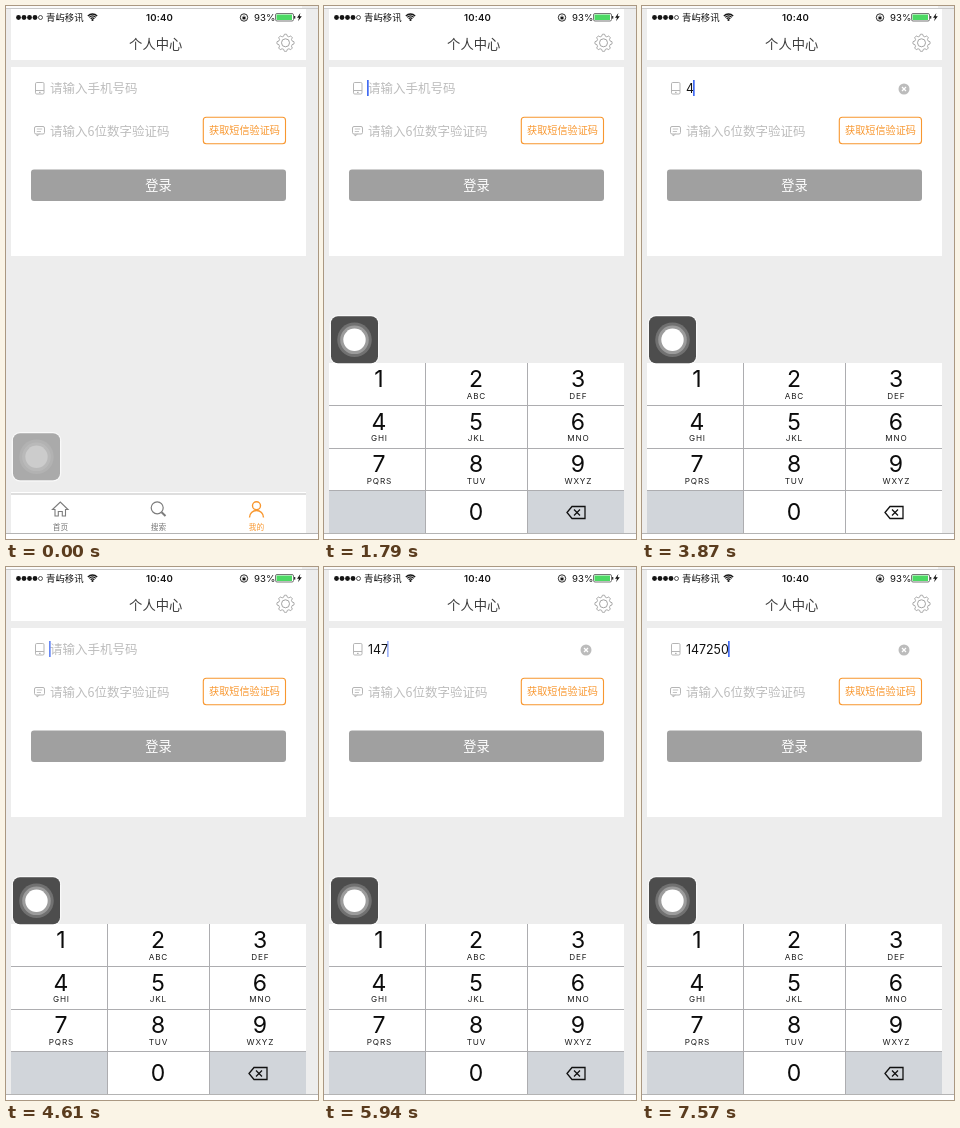
An HTML page with a canvas that plays this animation: 312x533 px, repeating every 8000 ms.

```html
<!DOCTYPE html>
<html lang="zh">
<head>
<meta charset="utf-8">
<title>个人中心</title>
<style>
html, body { margin: 0; width: 100%; height: 100%; overflow: hidden; background: #ededed; }
canvas { display: block; width: 312px; height: 533px; }
</style>
</head>
<body>
<canvas id="stage"></canvas>
<script>
const W = 312, H = 533, LOOP = 8000;
const LATIN = 'Inter, Roboto, sans-serif';
const HAN = '"Noto Sans CJK SC", "Noto Sans CJK", sans-serif';
const ORANGE = '#f8972f', KEY_GRAY = '#d1d5da', LINE = '#adadb0';

const canvas = document.getElementById('stage');
const ctx = canvas.getContext('2d');
const ratio = window.devicePixelRatio || 1;
canvas.width = W * ratio;
canvas.height = H * ratio;

// [start, typed digits, pressed key]
const typing = [
  [0, '', ''],
  [2090, '', '4'], [2240, '4', ''], [2390, '4', '7'], [2540, '47', ''],
  [3870, '4', 'del'], [4020, '', 'del'], [4170, '', ''],
  [4760, '', '1'], [4910, '1', ''], [5050, '1', '4'], [5200, '14', ''],
  [5350, '14', '7'], [5490, '147', '7'], [5640, '147', ''],
  [6690, '147', '2'], [6840, '1472', ''], [6990, '1472', '5'],
  [7130, '14725', ''], [7280, '14725', '0'], [7430, '147250', '0'], [7570, '147250', '']
];
// [start, caret opacity]
const blink = [
  [0, 0], [1050, 1], [2990, .6], [3130, .25], [3280, 0], [3570, 1],
  [4610, .8], [4760, 1], [5940, .5], [6090, 0], [6390, .6], [6540, 1]
];
// moments at which the sliding parts are redrawn
const slide = [[0], [1050], [1200], [1340], [1490], [1640], [1790]];

const keys = [['1', ''], ['2', 'ABC'], ['3', 'DEF'], ['4', 'GHI'], ['5', 'JKL'], ['6', 'MNO'],
  ['7', 'PQRS'], ['8', 'TUV'], ['9', 'WXYZ'], ['', ''], ['0', ''], ['del', '']];
const colX = [5, 101.5, 203.5, 300], colMid = [55, 152, 254], ROW = 42.5;

const at = (list, t) => list.filter(s => s[0] <= t).pop();
const clamp = v => Math.max(0, Math.min(1, v));

function box(x, y, w, h, color) {
  ctx.fillStyle = color;
  ctx.fillRect(x, y, w, h);
}

function round(x, y, w, h, r) {
  ctx.beginPath();
  ctx.roundRect(x, y, w, h, r);
}

function disc(x, y, r, color) {
  ctx.beginPath();
  ctx.arc(x, y, r, 0, 7);
  ctx.fillStyle = color;
  ctx.fill();
}

function ring(x, y, r, color, width) {
  ctx.beginPath();
  ctx.arc(x, y, r, 0, 7);
  stroke(color, width);
}

function stroke(color, width) {
  ctx.strokeStyle = color;
  ctx.lineWidth = width;
  ctx.stroke();
}

function path(points, color, width, closed) {
  ctx.beginPath();
  points.forEach(p => ctx.lineTo(p[0], p[1]));
  if (closed) ctx.closePath();
  stroke(color, width);
}

function text(str, x, y, size, color, { align = 'center', weight = 400, family = HAN, gap = 0 } = {}) {
  ctx.font = `${weight} ${size}px ${family}`;
  ctx.letterSpacing = gap + 'px';
  ctx.textAlign = align;
  ctx.fillStyle = color;
  ctx.fillText(str, x, y);
}

function statusBar() {
  const ink = '#151515';
  for (let i = 0; i < 4; i++) disc(12.5 + i * 5.5, 11.5, 2.4, ink);
  ring(34.5, 11.5, 2, ink, .7);
  text('青屿移讯', 40, 15, 9.4, ink, { align: 'left' });
  for (const r of [2.6, 4.6, 6.6]) {
    ctx.beginPath();
    ctx.arc(86.5, 14.6, r, -Math.PI * .75, -Math.PI * .25);
    stroke(ink, 1.3);
  }
  disc(86.5, 14, 1.1, ink);
  text('10:40', 153.5, 15, 9.6, ink, { weight: 600, family: LATIN, gap: .2 });
  ring(238, 11.5, 3.7, ink, .9);
  box(236.5, 11, 3, 2.4, ink);
  ring(238, 10.8, 1, ink, .6);
  text('93%', 248, 15, 9.6, ink, { align: 'left', family: LATIN });
  round(269.5, 7.5, 18, 7.5, 1.5);
  stroke('#555', .8);
  box(270.5, 8.5, 15.5, 5.5, '#4cd964');
  box(288, 10, 1.3, 2.6, '#333');
  ctx.beginPath();
  [[294.4, 7], [291, 11.8], [293, 11.8], [292, 15.2], [295.8, 10.3], [293.6, 10.3]].forEach(p => ctx.lineTo(...p));
  ctx.fillStyle = ink;
  ctx.fill();
}

function gear(x, y) {
  ctx.beginPath();
  for (let i = 0; i < 96; i++) {
    const a = i / 96 * Math.PI * 2;
    const r = 7.7 + .9 * Math.tanh(3 * Math.cos(a * 8));
    ctx.lineTo(x + r * Math.cos(a), y + r * Math.sin(a));
  }
  ctx.closePath();
  stroke('#a2a2a2', 1);
  ring(x, y, 4, '#a2a2a2', 1);
}

function form(typed, caret) {
  const pale = '#b5b5b5', hint = '#bdbdbd';
  box(5, 61, 295, 189, '#fff');
  round(29.5, 76.5, 8.5, 11.5, 1.2);
  stroke(pale, 1);
  path([[29.5, 84.5], [38, 84.5]], pale, 1);
  box(33, 85.8, 1.6, 1.2, pale);
  if (typed) {
    text(typed, 44, 86.7, 12.4, '#111', { align: 'left', family: LATIN });
    disc(262, 83, 5.5, '#bcbcbc');
    path([[260, 81], [264, 85]], '#fff', 1.2);
    path([[264, 81], [260, 85]], '#fff', 1.2);
  } else {
    text('请输入手机号码', 44, 86.6, 12.5, hint, { align: 'left', weight: 300 });
  }
  ctx.font = `400 12.4px ${LATIN}`;
  ctx.letterSpacing = '0px';
  const caretX = Math.round(43.4 + ctx.measureText(typed).width);
  ctx.globalAlpha = caret;
  box(caretX, 74, 1.7, 16, '#426bf2');
  ctx.globalAlpha = 1;

  round(28.5, 120.5, 10, 7.5, 1.5);
  stroke(pale, 1);
  path([[31, 128], [31, 130], [33.5, 128]], pale, .9);
  path([[30.8, 123], [36.2, 123]], pale, .8);
  path([[30.8, 125.5], [35, 125.5]], pale, .8);
  text('请输入6位数字验证码', 44, 129.8, 12.5, hint, { align: 'left', weight: 300 });
  round(197.3, 111.3, 82.2, 26.5, 3);
  stroke(ORANGE, 1.1);
  text('获取短信验证码', 238.5, 128.3, 10.15, ORANGE, { weight: 500 });
  round(25, 163.5, 255, 31.5, 3);
  ctx.fillStyle = '#a0a0a0';
  ctx.fill();
  text('登录', 152.5, 183.8, 13.2, '#fff');
}

function tabBar() {
  const gray = '#7c7c7c';
  box(5, 486, 295, 41, '#fff');
  box(5, 487.5, 295, 1, '#bdbdbd');
  path([[46.5, 503.5], [54.3, 496], [62, 503.5], [59.5, 503.5], [59.5, 510], [56.3, 510], [56.3, 505.5],
    [52.3, 505.5], [52.3, 510], [49, 510], [49, 503.5]], gray, 1.1, true);
  ring(151.2, 501.8, 6, gray, 1.2);
  path([[155.6, 506.2], [159.5, 510]], gray, 2);
  ring(250.5, 499.7, 4, ORANGE, 1.4);
  ctx.beginPath();
  ctx.arc(250.5, 511.5, 7, Math.PI, 0);
  stroke(ORANGE, 1.4);
  text('首页', 54.5, 523.8, 7.7, '#777');
  text('搜索', 152.5, 523.8, 7.7, '#777');
  text('我的', 250.5, 523.8, 7.7, ORANGE, { weight: 500 });
}

function backspace(x, y) {
  path([[x - 9, y], [x - 4, y - 6], [x + 9, y - 6], [x + 9, y + 6], [x - 4, y + 6]], '#111', 1.3, true);
  path([[x - 2, y - 3], [x + 4, y + 3]], '#111', 1.3);
  path([[x + 4, y - 3], [x - 2, y + 3]], '#111', 1.3);
}

function keyboard(top, pressed) {
  ctx.save();
  ctx.beginPath();
  ctx.rect(5, top, 295, 527 - top);
  ctx.clip();
  keys.forEach(([digit, letters], i) => {
    const col = i % 3, row = Math.floor(i / 3);
    const y = top + row * ROW, x = colX[col], mid = colMid[col];
    const gray = (digit === '' || digit === 'del') !== (digit !== '' && digit === pressed);
    box(x, y, colX[col + 1] - x, ROW + .5, gray ? KEY_GRAY : '#fff');
    if (digit === 'del') backspace(mid - 2, y + 22);
    else text(digit, mid, y + (row === 3 ? 29.5 : 24.3), 23, '#0c0c0c', { family: LATIN });
    if (letters) text(letters, mid + .4, y + 35.7, 8.2, '#1c1c1c', { family: LATIN, gap: .8 });
  });
  for (let r = 1; r < 4; r++) box(5, Math.floor(top + r * ROW), 295, 1, LINE);
  box(101, top, 1, 170, LINE);
  box(203, top, 1, 170, LINE);
  ctx.restore();
}

function floatButton(y, active) {
  const mix = (a, b) => a + (b - a) * active;
  const white = a => `rgba(255,255,255,${a})`;
  round(6.3, y - .7, 48.4, 48.4, 8);
  stroke(white(.7), 1.2);
  round(7, y, 47, 47, 7);
  ctx.fillStyle = `rgba(77,77,77,${mix(.42, 1)})`;
  ctx.fill();
  disc(30.5, y + 23.5, 17.3, white(mix(.09, .2)));
  disc(30.5, y + 23.5, 14.3, white(mix(.1, .3)));
  disc(30.5, y + 23.5, 11.2, white(mix(.27, 1)));
}

function draw(t) {
  const [, typed, pressed] = at(typing, t);
  const moment = at(slide, t)[0];
  ctx.setTransform(ratio, 0, 0, ratio, 0, 0);
  box(0, 0, W, H, '#ededed');
  box(0, 0, 296, 2, '#fbfbfb');
  box(5, 3, 295, 51, '#fff');
  box(0, 2, W, 1, '#c9c9c9');

  statusBar();
  text('个人中心', 149.7, 42.7, 13.3, '#3c3c3c');
  gear(279.5, 36.8);
  form(typed, at(blink, t)[1]);
  tabBar();

  if (moment) {
    const s = (moment - 1014) * .0175;
    keyboard(357 + Math.round(170 * (1 + s) * Math.exp(-s)), pressed);
  }
  const p = clamp((moment - 1280) / 470);
  const ease = p * p * (3 - 2 * p);
  floatButton(427.3 - 117 * ease, ease);

  box(0, 527, W, 1, '#b4b4b4');
  box(0, 528, W, 5, '#fff');
}

const start = performance.now();
function frame() {
  draw((performance.now() - start) % LOOP);
  requestAnimationFrame(frame);
}
frame();
</script>
</body>
</html>
```
